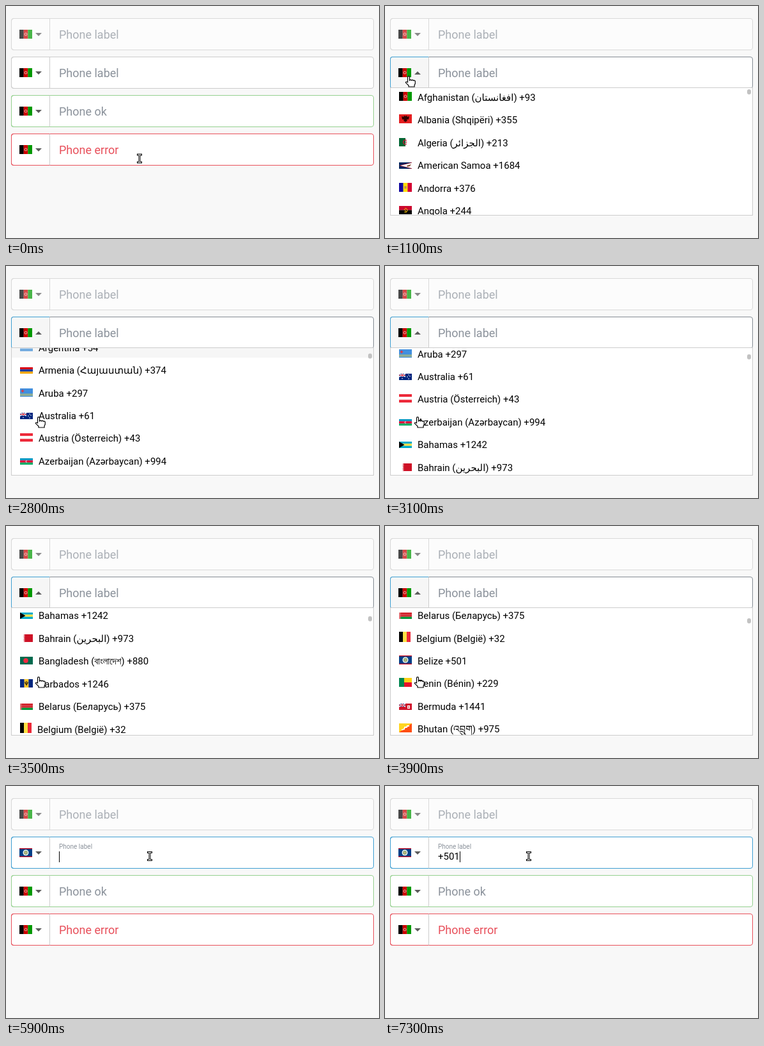
Animation of 584 by 362 pixels, one loop 8 s. Source, as an HTML page:

```html
<!DOCTYPE html>
<html lang="en">
<head>
<meta charset="utf-8">
<title>Phone number inputs</title>
<style>
  html, body { margin: 0; width: 100%; height: 100%; overflow: hidden; background: #f8f8f8; }
  #stage { position: relative; width: 584px; height: 362px; overflow: hidden; font: 15px Roboto, "Noto Sans", sans-serif; color: #000; }
  #stage * { box-sizing: border-box; }
  svg { display: block; flex: none; }
  .field { position: absolute; left: 8px; width: 568px; height: 50px; border: 1px solid #ccc; border-radius: 4px; background: #fff; color: #8b929b; }
  .disabled { opacity: .7; }
  .ok { border-color: #95d08f; }
  .error { border-color: #e8505b; color: #e8505b; }
  .focus { border-color: #3f9fd2; }
  .open { border-color: #838b93; }
  .btn { position: absolute; left: -1px; top: -1px; width: 61px; height: 50px; border: inherit; border-right-color: #ccc; border-radius: 4px 0 0 4px; }
  .open .btn { border-color: #3f9fd2 #ccc #3f9fd2 #3f9fd2; background: #f6f6f6; }
  .btn svg { position: absolute; left: 12px; bottom: 17px; }
  .arrow { position: absolute; left: 37px; top: 22px; border: 5px solid transparent; border-top-color: #5c5c5c; border-bottom: 0; }
  .open .arrow { transform: scaleY(-1); }
  .label { position: absolute; left: 74px; top: 14px; font-size: 18px; line-height: 22px; white-space: nowrap; transform-origin: 0 50%; }
  .value { position: absolute; left: 74px; top: 20px; height: 20px; line-height: 20px; color: #000; }
  .caret { position: absolute; left: 100%; top: 2px; width: 1px; height: 17px; background: #000; }
  #list { position: absolute; left: 8px; top: 127px; width: 568px; height: 200px; border: 1px solid #ccc; background: #fff; overflow: hidden; }
  .row { position: absolute; left: 0; width: 100%; height: 30px; padding: 0 13px 10px; display: flex; align-items: flex-end; white-space: nowrap; }
  .row.hover { background: #f6f6f6; }
  .row span { margin: 0 0 -10px 9px; line-height: 30px; }
  #thumb { position: absolute; left: 558px; top: 2px; width: 6px; height: 8px; border-radius: 3px; background: #c2c2c2; }
  #cursor { position: absolute; left: 0; top: 0; width: 1px; height: 1px; overflow: visible; }
</style>
</head>
<body>
<div id="stage"></div>
<script>
const LOOP = 8000, TICK = 100, PITCH = 35.45;
const OPEN = 1000, PICK = 4700, PICKED = 20;

// Flag drawing helpers, on a canvas 20 units wide
const rect = (x, y, w, h, c) => `<rect x="${x}" y="${y}" width="${w}" height="${h}" fill="${c}"/>`;
const dot = (x, y, r, c) => `<circle cx="${x}" cy="${y}" r="${r}" fill="${c}"/>`;
const path = (d, c) => `<path d="${d}" fill="${c}"/>`;
const line = (d, c, w = 1) => `<path d="${d}" stroke="${c}" stroke-width="${w}" fill="none"/>`;
const bars = (h, ...cs) => cs.map((c, i) => rect(i * 20 / cs.length, 0, 20 / cs.length + .1, h, c)).join('');
const bands = (h, ...cs) => cs.map((c, i) => rect(0, i * h / cs.length, 20, h / cs.length + .1, c)).join('');
const jack = line('M0 0L10 5M10 0L0 5', '#fff', 1.3) + line('M5 0V5M0 2.5H10', '#fff', 2) + line('M5 0V5M0 2.5H10', '#d0142c');

// name, height, drawing, width
const countries = [
  ['Afghanistan (افغانستان\u200e) +93', 14, bars(14, '#000', '#c00', '#090') + dot(10, 7, 2.5, '#e08a80') + dot(10, 7, 1.2, '#c00')],
  ['Albania (Shqipëri) +355', 14, bands(14, '#e41e20') + path('M10 3L8 2 7 4 4 3 5 8 8 8 7 10 10 12 13 10 12 8 15 8 16 3 13 4 12 2Z', '#300')],
  ['Algeria (الجزائر\u200e) +213', 13, bars(13, '#006633', '#fff') + line('M12 4.2A3.2 3.2 0 1 0 12 8.8', '#d21034', 1.1) + dot(11.3, 6.5, 1, '#d21034')],
  ['American Samoa +1684', 10, bands(10, '#00245d') + path('M0 5L20 0V10Z', '#bd1021') + path('M2 5L20 .8V9.2Z', '#fff') + path('M12 5L19 3 17 6 13 7Z', '#8a5030')],
  ['Andorra +376', 14, bars(14, '#10069f', '#fedd00', '#d50032') + rect(8.3, 5, 3.4, 4, '#c58b55')],
  ['Angola +244', 13, bands(13, '#cc092f', '#000') + line('M9 4A3 3 0 1 1 8 9M8 5L12 10', '#ffcb00')],
  ['Anguilla +1264', 10, bands(10, '#00247d') + jack + path('M13 2.5H17V5Q17 7 15 8 13 7 13 5Z', '#fff') + dot(15, 4.5, 1, '#f90')],
  ['Antigua and Barbuda +1268', 13, bands(13, '#ce1126') + path('M0 0H20L10 13Z', '#000') + path('M4 5H16L10 13Z', '#0072c6') + path('M7 8.5H13L10 13Z', '#fff') + path('M6 5L7.5 2.5 10 1.5 12.5 2.5 14 5Z', '#fcd116')],
  ['Argentina +54', 13, bands(13, '#74acdf', '#fff', '#74acdf') + dot(10, 6.5, 1.4, '#f0b32e')],
  ['Armenia (Հայաստան) +374', 10, bands(10, '#d90012', '#0033a0', '#f2a800')],
  ['Aruba +297', 13, bands(13, '#418fde') + line('M0 9H20M0 11H20', '#f8d830', .8) + path('M4 1L5 3 7 4 5 5 4 7 3 5 1 4 3 3Z', '#d63a4a')],
  ['Australia +61', 10, bands(10, '#00247d') + jack + [[5, 7.5], [15, 2], [13, 5], [17, 4], [15, 8]].map(([x, y]) => dot(x, y, .8, '#fff')).join('')],
  ['Austria (Österreich) +43', 13, bands(13, '#ed2939', '#fff', '#ed2939')],
  ['Azerbaijan (Azərbaycan) +994', 10, bands(10, '#0098c3', '#e00034', '#00ae65') + line('M11 4A1.3 1.3 0 1 0 11 6', '#fff', .8)],
  ['Bahamas +1242', 10, bands(10, '#00abc9', '#fae042', '#00abc9') + path('M0 0L8.5 5 0 10Z', '#000')],
  ['Bahrain (البحرين\u200e) +973', 12, bands(12, '#ce1126') + path('M0 0H5L8 1.2 5 2.4 8 3.6 5 4.8 8 6 5 7.2 8 8.4 5 9.6 8 10.8 5 12H0Z', '#fff')],
  ['Bangladesh (বাংলাদেশ) +880', 12, bands(12, '#006a4e') + dot(9, 6, 3.8, '#f42a41')],
  ['Barbados +1246', 13, bars(13, '#00267f', '#ffc726', '#00267f') + line('M8 4V6Q8 8 10 8T12 6V4M10 3V10', '#000')],
  ['Belarus (Беларусь) +375', 10, bands(10, '#d22730', '#d22730', '#009739') + rect(0, 0, 2.3, 10, '#e9a0a0') + line('M1.2 0V10', '#d22730', .8)],
  ['Belgium (België) +32', 16, bars(16, '#000', '#fae042', '#ed2939'), 18],
  ['Belize +501', 14, bands(14, '#003f87') + rect(0, 0, 20, 1.3, '#ce1126') + rect(0, 12.7, 20, 1.3, '#ce1126') + dot(10, 7, 4.5, '#fff') + dot(10, 7, 3.2, '#8fae86') + dot(10, 7, 1.6, '#c9b978')],
  ['Benin (Bénin) +229', 14, bands(14, '#fcd116', '#e8112d') + rect(0, 0, 8, 14, '#008751')],
  ['Bermuda +1441', 10, bands(10, '#cf142b') + rect(0, 0, 10, 5, '#00247d') + jack + rect(13, 3, 4, 5, '#fff') + dot(15, 5.5, 1.1, '#c33')],
  ['Bhutan (འབྲུག) +975', 14, bands(14, '#ff4e12') + path('M0 0H20L0 14Z', '#ffd520') + line('M4 10L8 9 9 6 12 6 13 4 16 4', '#fff', 1.8)]
];

const flag = i => {
  const [, h, art, w = 20] = countries[i];
  return `<svg width="${w}" height="${h}" viewBox="0 0 20 ${h}" preserveAspectRatio="none">${art}</svg>`;
};

const field = (top, kind, text) => `<div class="field ${kind}" style="top:${top}px">
  <div class="btn"><i>${flag(0)}</i><div class="arrow"></div></div>
  <div class="label">${text}</div></div>`;

const stage = document.getElementById('stage');
stage.innerHTML =
  field(19, 'disabled', 'Phone label') + field(79, 'main', 'Phone label') +
  field(139, 'ok', 'Phone ok') + field(199, 'error', 'Phone error') +
  `<div id="list"><div id="rows">${countries.map(([name], i) =>
    `<div class="row" style="top:${Math.round(i * PITCH)}px">${flag(i)}<span>${name}</span></div>`).join('')}</div>
    <div id="thumb"></div></div>
  <svg id="cursor">
    <path id="hand" d="M-1.5 9V1.2a1.5 1.5 0 0 1 3 0V6q1.5-1.6 3 0q1.6-1.4 3 .4q2-.8 2.8.8V11l-1.2 2.5V16H0V14L-4.6 9.6q0-2.4 3.1-.6z" fill="#fff" stroke="#000" stroke-width="1.2"/>
    <g id="beam" fill="none"><path d="M-4-6H4M-4 6H4M0-6V6" stroke="#000" stroke-width="3"/>
    <path d="M-3-6H3M-3 6H3M0-6V6" stroke="#fff"/></g>
  </svg>`;

const $ = s => stage.querySelector(s);
const main = $('.main'), mainFlag = $('.main i'), label = $('.main .label');
const list = $('#list'), rows = $('#rows'), thumb = $('#thumb');
const cursor = $('#cursor'), hand = $('#hand'), beam = $('#beam');
const rowEls = [...rows.children];
main.insertAdjacentHTML('beforeend', '<div class="value"><span></span><div class="caret"></div></div>');
const value = $('.value span'), caret = $('.caret');

// time, x, y
const cursorPath = [
  [0, 209, 238], [100, 232, 218], [200, 274, 172], [300, 262, 124], [400, 190, 92],
  [500, 105, 97], [600, 54, 106], [700, 37, 110], [1400, 37, 110], [1600, 42, 146],
  [1800, 50, 225], [1900, 51, 236], [4200, 51, 236], [4400, 58, 222], [4600, 66, 201],
  [4700, 66, 201], [4800, 110, 172], [4900, 175, 140], [5000, 245, 110],
  [5100, 287, 91], [5200, 250, 102], [5300, 225, 109.5]
];
// time, offset
const scrollPath = [
  [1900, 0], [2000, 28], [2200, 122], [2400, 185], [2500, 185], [2600, 222], [2800, 299],
  [3000, 350], [3200, 370], [3300, 370], [3500, 499], [3700, 597], [3900, 641], [4000, 647]
];
const scrollSpans = [[1900, 2400], [2500, 3200], [3300, 4000]];
const typed = [[6500, '+'], [6900, '+5'], [7100, '+50'], [7300, '+501']];

function sample(keys, t, k = 1) {
  const i = keys.findIndex(key => key[0] > t);
  if (i < 0) return keys[keys.length - 1][k];
  if (i === 0) return keys[0][k];
  const a = keys[i - 1], b = keys[i];
  return a[k] + (b[k] - a[k]) * (t - a[0]) / (b[0] - a[0]);
}
const ramp = (t, from, to) => Math.min(1, Math.max(0, (t - from) / (to - from)));

// The highlight stays on its row while the list scrolls
function hoveredRow(t) {
  const span = scrollSpans.find(([a, b]) => t >= a && t < b);
  const at = span ? span[0] : t;
  const y = sample(cursorPath, at, 2);
  if (y < 128) return -1;
  const pos = y - 128 + sample(scrollPath, at), i = Math.floor(pos / PITCH);
  return pos - i * PITCH < 30 ? i : -1;
}

function render(t) {
  const open = t >= OPEN && t < PICK, picked = t >= PICK;
  main.classList.toggle('open', open);
  main.classList.toggle('focus', picked);
  const flagIndex = picked ? PICKED : 0;
  if (mainFlag.dataset.i !== String(flagIndex)) {
    mainFlag.dataset.i = flagIndex;
    mainFlag.innerHTML = flag(flagIndex);
  }

  list.style.opacity = ramp(t, OPEN - 100, OPEN + 100) * (1 - ramp(t, PICK - 100, PICK + 100));
  const scroll = Math.round(sample(scrollPath, t));
  rows.style.transform = `translateY(${-scroll}px)`;
  thumb.style.transform = `translateY(${scroll * .0217}px)`;
  const hover = open ? hoveredRow(t) : -1;
  rowEls.forEach((el, i) => el.classList.toggle('hover', i === hover));

  const lift = ramp(t, PICK, PICK + 200);
  label.style.transform = lift ? `translateY(${-10.5 * lift}px) scale(${1 - .444 * lift})` : '';
  value.textContent = typed.reduce((text, [at, s]) => t >= at ? s : text, '');
  caret.hidden = t < 5900;

  const x = sample(cursorPath, t, 1), y = sample(cursorPath, t, 2);
  cursor.style.transform = `translate(${x}px, ${y}px)`;
  hand.style.display = x < 70 ? '' : 'none';
  beam.style.display = x < 70 ? 'none' : '';
}

const start = performance.now();
function loop() {
  const t = (performance.now() - start) % LOOP;
  render(Math.floor(t / TICK) * TICK);
  requestAnimationFrame(loop);
}
loop();
</script>
</body>
</html>
```
